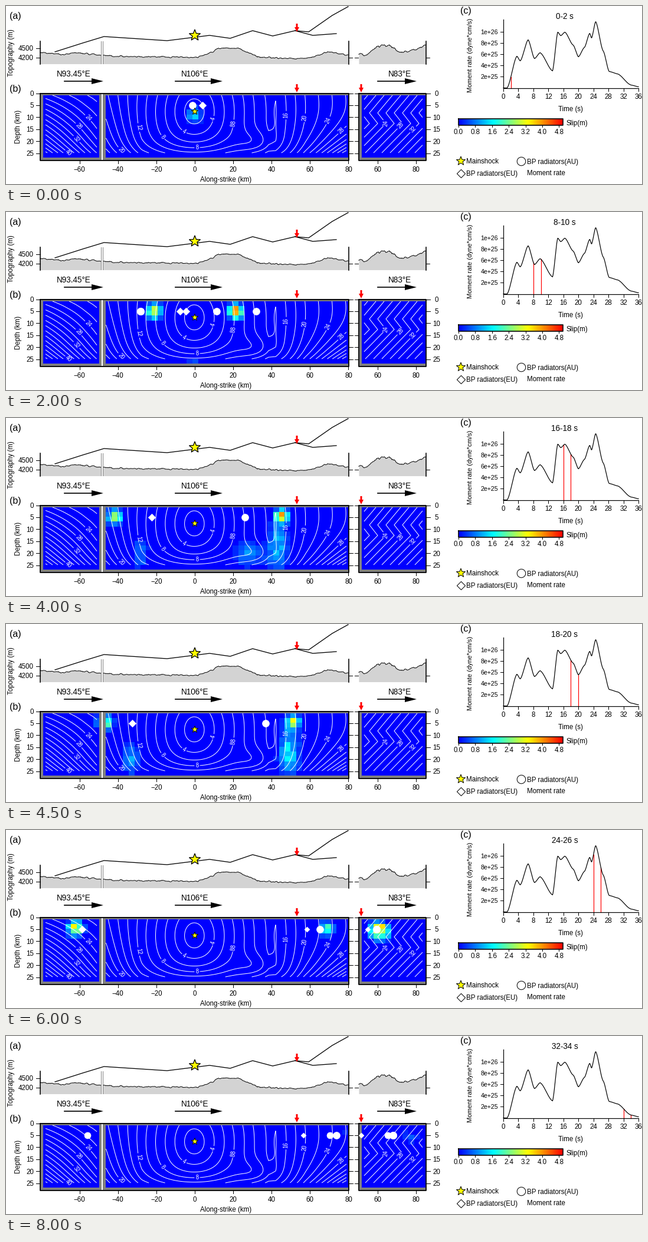
A matplotlib script that plays this animation: 1078 by 303 pixels, repeating every 8.5 s.

```python
import numpy as np
import matplotlib.pyplot as plt
from matplotlib.animation import FuncAnimation
from matplotlib.colors import LinearSegmentedColormap
from matplotlib.patches import Polygon, Rectangle

W, H = 1078, 303
STEPS, INTERVAL = 17, 500
plt.rcParams["font.family"] = "Liberation Sans"

fig = plt.figure(figsize=(W / 72, H / 72), dpi=72, facecolor="white")
ax = fig.add_axes([0, 0, 1, 1])
ax.axis("off")
ax.set_xlim(0, W)
ax.set_ylim(H, 0)
jet = LinearSegmentedColormap.from_list("slip", ["#0000ff", "#00ffff", "#ffff00", "#ff0000"])


def text(x, y, s, size=11.5, ha="center", rot=0):
    return ax.text(x, y, s, fontsize=size, ha=ha, va="center" if rot else "center_baseline",
                   rotation=rot, zorder=6)


def line(xs, ys, lw=1.0, color="black", z=5):
    return ax.plot(xs, ys, lw=lw, color=color, zorder=z)[0]


def box(x0, y0, x1, y1, color, z=1):
    ax.add_patch(Rectangle((x0, y0), x1 - x0, y1 - y0, fc=color, ec="none", zorder=z))


def shape(pts, color, edge="none", lw=0):
    ax.add_patch(Polygon(pts, fc=color, ec=edge, lw=lw, zorder=8))


def star(x, y, r, lw=1):
    a = np.arange(10) * np.pi / 5
    k = np.where(np.arange(10) % 2, 0.42 * r, r)
    shape(np.c_[x + k * np.sin(a), y - k * np.cos(a)], "yellow", "black", lw)


def red_arrow(x, y):
    shape([(x - 1.5, y), (x + 1.5, y), (x + 1.5, y + 6), (x + 4, y + 6),
           (x, y + 14), (x - 4, y + 6), (x - 1.5, y + 6)], "red")


def heading(x0, x1, label, lx):
    text(lx, 115, label, 13.5)
    line([x0, x1 - 15], [128, 128], 1.7)
    shape([(x1, 128), (x1 - 20, 123), (x1 - 20, 133)], "black")


def bump(x, mid, width):
    return np.exp(-0.5 * ((x - mid) / width) ** 2)


# (a) fault trace and topography
text(16, 16, "(a)", 16)
text(9, 80, "Topography (m)", rot=90)
line([83, 130, 166, 273, 345, 380, 418, 452, 490, 520, 560],
     [78, 63, 52, 59, 50, 55, 42, 51, 42, 50, 47], 1.3)
line([490, 513, 553, 580], [42, 44, 16, 1], 1.3)


def terrain(xs, ys, seed, rough):
    q = np.arange(xs[0], xs[-1] + 1)
    noise = np.random.default_rng(seed).normal(0, rough, q.size)
    y = np.interp(q, xs, ys) + np.convolve(noise, np.ones(4) / 2, "same")
    ax.fill_between(q, y, 98.5, color="#d3d3d3", lw=0, zorder=2)
    line(q, y, z=3)


terrain([58, 98, 118, 140, 200, 325, 345, 360, 395, 430, 510, 545, 580],
        [79, 83, 79, 82, 86, 87, 80, 72, 72, 88, 90, 78, 83], 4, 0.6)
terrain([598, 612, 632, 655, 665, 695, 712], [84, 82, 68, 68, 78, 75, 66], 8, 1.1)
box(161, 60, 165, 99, "#808080", 3)
box(162, 60, 164, 99, "white", 4)
for x in (58, 580.5, 712):
    line([x, x], [60, 99], 1.6)
for y, s in ((72, "4500"), (88, "4200")):
    text(47, y, s, ha="right")
    line([51, 58], [y, y])
for x in (581, 591, 712):
    line([x, x + 6], [88, 88])
star(320, 50, 10, 1.3)
red_arrow(493, 30)
heading(99, 165, "N93.45°E", 115)
heading(287, 367, "N106°E", 320)
heading(630, 696, "N83°E", 667)

# (b) fault plane
text(16, 140, "(b)", 16)
text(21, 205, "Depth (km)", rot=90)
for x0, x1 in ((58, 580.5), (598, 712)):
    box(x0, 148, x1, 262.5, "#808080")
    line([x0, x1, x1, x0, x0], [148.5, 148.5, 262.5, 262.5, 148.5], 1.8)
box(162, 149, 164, 262, "white", 3)
for d in range(0, 30, 5):
    y = 148.5 + d * 4.08
    text(47, y, str(d), ha="right")
    text(730, y, str(d))
    for x0 in (51, 581, 591, 712):
        line([x0, x0 + 7], [y, y])
for x, k in [(320 + 3.256 * k, k) for k in range(-60, 81, 20)] + [(630, 60), (695, 80)]:
    line([x, x], [263, 268])
    text(x, 278, str(k).replace("-", "\u2212"))
text(372.5, 295, "Along-strike (km)")
star(320, 179.5, 6, 0.9)
red_arrow(493, 133)
red_arrow(602, 133)


# rupture time
def main_time(x, y):
    along = np.interp(x, [63, 105, 135, 170, 319, 421, 445, 457, 475, 508, 577],
                      [25, 22, 20, 18.2, 0, 12, 14.4, 13.9, 16, 20, 26])
    dy = y - 180
    down = np.where(dy > 0, dy / 10.5 + 2 * (np.maximum(dy, 0) / 60) ** 4, dy / 11)
    t = np.hypot(along, down) - 3 * bump(x, 425, 22) * bump(y, 233, 15)
    t += 0.0067 * np.maximum(x - 470, 0) ** 1.6 * ((y - 150) / 100) ** 3
    return t + 0.0007 * np.maximum(230 - x, 0) * (y - 152)


def west_time(x, y):
    return main_time(x, y) + (0.03 + 0.0009 * (155 - x)) * (y - 152)


def east_time(x, y):
    return 24 + (x - np.interp(y, [152, 182, 200, 250], [655, 630, 644, 595])) / 7


def isolines(time, x0, x1, labels):
    x, y = np.meshgrid(np.arange(x0, x1 + 1), np.arange(152, 251))
    style = dict(colors="white", linewidths=1, zorder=4)
    ax.contour(x, y, time(x, y), levels=np.arange(2, 60, 4), **style)
    major = ax.contour(x, y, time(x, y), levels=np.arange(4, 60, 4), **style)
    major.clabel(fontsize=9.5, fmt="%d", inline_spacing=2, manual=labels, zorder=4)


isolines(main_time, 169, 577, [(344, 190), (300, 217), (274, 216), (324, 241), (375, 201), (398, 204),
                               (218, 208), (475, 186), (198, 243), (504, 190), (538, 191), (566, 210)])
isolines(west_time, 67, 154, [(137, 193), (123, 205), (120, 226), (110, 246)])
isolines(east_time, 607, 706, [(644, 200), (665, 200), (688, 208)])

# (c) moment rate
text(779.5, 7, "(c)", 16)
text(787, 84, "Moment rate (dyne*cm/s)", 11.2, rot=90)
T0, DT, BASE = 843, 6.361, 139.5
line([T0, T0, 1072], [23, BASE, BASE], 1.2)
for i, s in enumerate(["2e+25", "4e+25", "6e+25", "8e+25", "1e+26"]):
    y = 120.3 - 19 * i
    text(834, y, s, 10.5, ha="right")
    line([838, T0], [y, y])
for t in range(0, 37, 4):
    line([T0 + DT * t] * 2, [140, 145])
    text(T0 + DT * t, 154, str(t))
text(957, 174, "Time (s)")

# turning points and shoulders of the curve, eased between
KNOT_T = np.array([0, 1, 3.6, 4.5, 6.6, 8.3, 9.8, 13.1, 14.5, 15.3, 16.4, 18.6, 20, 21.6, 23, 23.5, 24.6,
                   26.6, 28.2, 30.4, 34, 36])
KNOT_H = np.array([0, 0, 54, 46, 82, 50, 60, 29, 95, 89, 95, 73, 53, 69, 93, 85, 113, 63, 28, 24, 5, 2])


def rate(t):
    i = np.clip(np.searchsorted(KNOT_T, t, side="right") - 1, 0, len(KNOT_T) - 2)
    u = (t - KNOT_T[i]) / (KNOT_T[i + 1] - KNOT_T[i])
    ease = 0.35 * u + 0.65 * u * u * (3 - 2 * u)
    return BASE - KNOT_H[i] - (KNOT_H[i + 1] - KNOT_H[i]) * ease


ts = np.linspace(0, 36, 460)
line(T0 + DT * ts, rate(ts), 1.2)

# colour scale and legend
ax.imshow(np.linspace(0, 1, 178)[None], cmap=jet, extent=(767, 944, 203, 192), aspect="auto", zorder=2)
line([767, 944, 944, 767, 767], [192, 192, 203, 203, 192], 1.6)
for v in np.arange(0, 4.9, 0.8):
    line([767 + 35.5 * v] * 2, [203, 206])
    text(767 + 35.5 * v, 214, f"{v:.1f}")
text(950, 198, "Slip(m)", ha="left")
star(771, 264, 8)
for x, y, marker, size in ((873, 264, "o", 14.5), (771, 284.5, "D", 10)):
    ax.scatter(x, y, s=size ** 2, marker=marker, fc="white", ec="black", lw=1, zorder=6)
for x, y, s in ((780, 264, "Mainshock"), (883, 264, "BP radiators(AU)"),
                (780, 284, "BP radiators(EU)"), (883, 284, "Moment rate")):
    text(x, y, s, ha="left")

# slip spreads both ways from the hypocentre, then onto the eastern strand
ROWS, TOP, BOTTOM = 13, 152, 258
SEGMENTS = [(63, 158, 10), (168.6, 579, 42), (603, 712, 11)]
planes = [ax.imshow(np.zeros((ROWS, n)), cmap=jet, vmin=0, vmax=5, extent=(x0, x1, BOTTOM, TOP),
                    aspect="auto", interpolation="nearest", zorder=2) for x0, x1, n in SEGMENTS]


def fronts(step):
    """Patches of slip as x, y, half width, half height, peak."""
    west = 316 - 16.5 * step
    east = np.interp(step, [0, 4, 6, 8, 12, 16], [322, 389, 411, 466, 542, 578])
    y = 168 + 16 * np.exp(-step / 1.5)
    deep = 1.6 * bump(step, 8.8, 1.3)
    return [(west, y, 8, 8, np.interp(step, [0, 4, 8, 12, 16], [0.6, 3.8, 3, 4.2, 0])),
            (east, y, 8, 8, np.interp(step, [0, 5, 9, 16], [0.6, 4.9, 3.2, 0.4])),
            (607 + 13 * (step - 10), 172, 10, 9,
             np.interp(step, [9, 10, 12, 14, 16], [0, 2.4, 4.6, 1.8, 0.5])),
            (west + 44, 230, 9, 18, 0.65 * deep),
            (east - 6, 220, 11, 26, deep),
            (east - 55, 232, 18, 14, 0.9 * bump(step, 8, 0.6)),
            (319, 190 + 16 * step, 8, 7, 0.5 * (step < 5))]


def slip(step, x0, x1, n):
    gx = x0 + (np.arange(n) + 0.5) * (x1 - x0) / n
    gy = TOP + (np.arange(ROWS)[:, None] + 0.5) * (BOTTOM - TOP) / ROWS
    s = sum(peak * bump(gx, x, sx) * bump(gy, y, sy) for x, y, sx, sy, peak in fronts(step))
    s = s * np.random.default_rng(100 + step).uniform(0.65, 1.25, (ROWS, n))
    return np.where(s < 0.25, 0, s)


# radiators: marker, steps, positions, radius; shown between first and last step
TRACKS = [("o", [0, 4, 6, 8, 10, 12, 16], [316, 357, 371, 405, 474, 532, 560], 6),
          ("o", [4, 6], [228, 249], 6.3), ("o", [4], [424], 6), ("o", [10], [504], 6.5),
          ("o", [10, 12, 16], [603, 628, 656], 6.3), ("o", [15, 16], [545, 549], 5.5),
          ("o", [15, 16], [644, 647], 5.5), ("o", [15, 16], [132, 138], 5.5),
          ("D", [0, 4, 6, 8, 10, 12], [333, 295, 276, 247, 181, 129], 6.3),
          ("D", [4], [305], 6.3), ("D", [10], [156], 6.3),
          ("D", [12, 16], [510, 504], 4.5), ("D", [12, 16], [613, 602], 4.5)]
dots = [ax.scatter(0, 169, s=(r * (2 if m == "o" else 1.4)) ** 2, marker=m, fc="white",
                   ec="white", lw=0.6, zorder=7) for m, _, _, r in TRACKS]

title = text(947, 16.5, "", 13.5)
bars = [line([], [], 1.2, "red", 4) for _ in range(2)]


def update(step):
    title.set_text(f"{2 * step}-{2 * step + 2} s")
    for plane, seg in zip(planes, SEGMENTS):
        plane.set_data(slip(step, *seg))
    for dot, (_, steps, xs, _) in zip(dots, TRACKS):
        dot.set_visible(steps[0] <= step <= steps[-1])
        dot.set_offsets([(np.interp(step, steps, xs), 169)])
    for bar, t in zip(bars, (2 * step, 2 * step + 2)):
        bar.set_data([T0 + DT * t] * 2, [BASE, rate(t)])
    return [title, *planes, *dots, *bars]


anim = FuncAnimation(fig, update, frames=STEPS, interval=INTERVAL, repeat=True, repeat_delay=0, blit=False)
plt.show()
```
